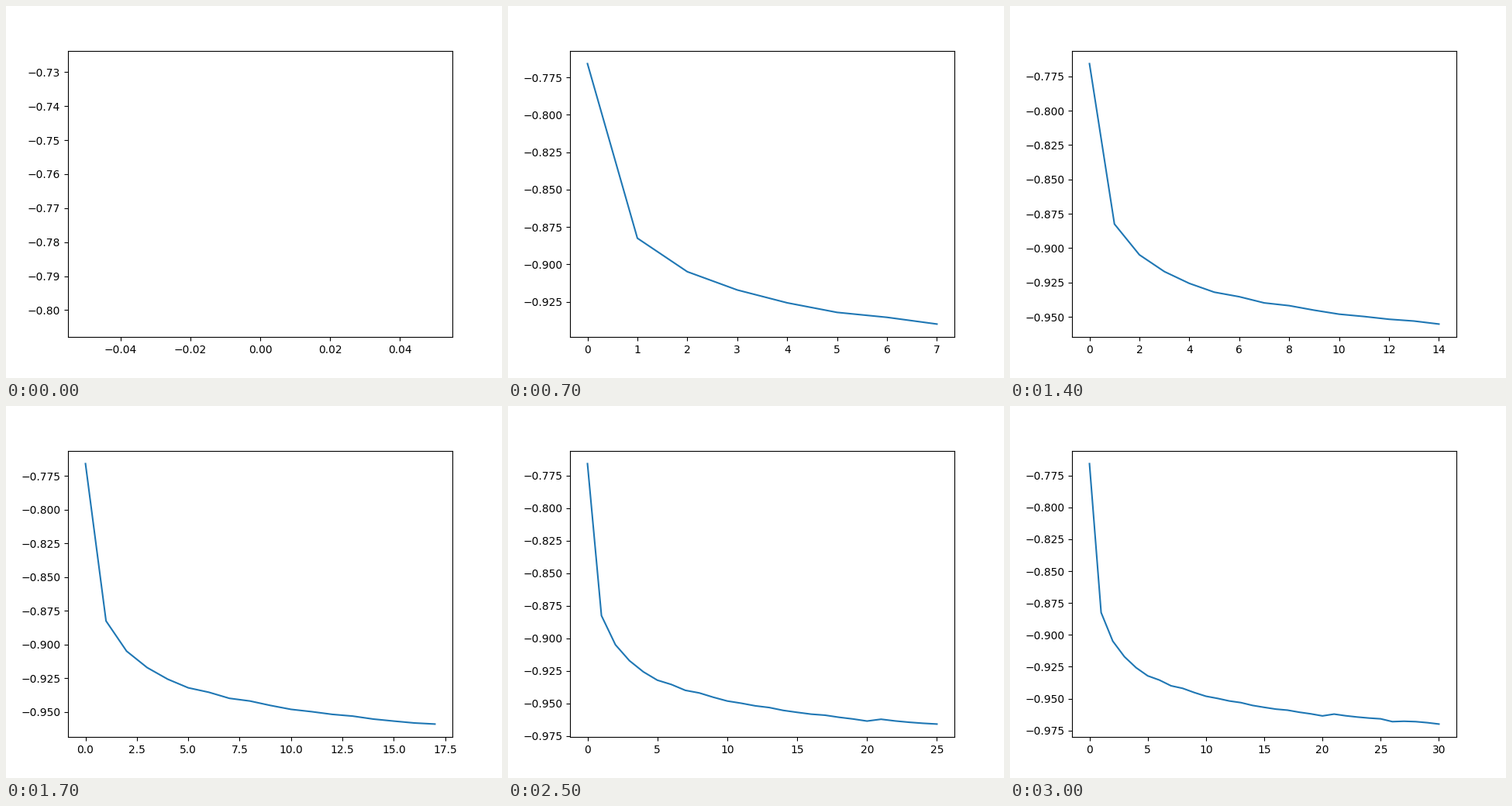
Write a matplotlib script that moves like this. It is 640 px wide and 480 px high and loops after 3100 ms.

```python
import matplotlib.pyplot as plt
from matplotlib.animation import FuncAnimation

STEP_MS = 100

# Score after each step; the curve grows by one point per frame.
SCORES = [
    -0.7658, -0.8825, -0.9049, -0.9171, -0.9257, -0.9321, -0.9354, -0.9399,
    -0.9419, -0.9452, -0.9481, -0.9498, -0.9518, -0.9531, -0.9553, -0.9568,
    -0.9582, -0.9590, -0.9606, -0.9619, -0.9635, -0.9621, -0.9634, -0.9644,
    -0.9652, -0.9658, -0.9680, -0.9677, -0.9680, -0.9688, -0.9699,
]

fig, ax = plt.subplots(figsize=(6.4, 4.8), dpi=100)


def draw(step):
    """Plot the scores up to this step, with freshly scaled axes."""
    ax.clear()
    ax.plot(range(step + 1), SCORES[:step + 1], color="C0", lw=1.5)
    return ax.lines


anim = FuncAnimation(fig, draw, frames=len(SCORES), interval=STEP_MS,
                     repeat=True, repeat_delay=0)
plt.show()
```
